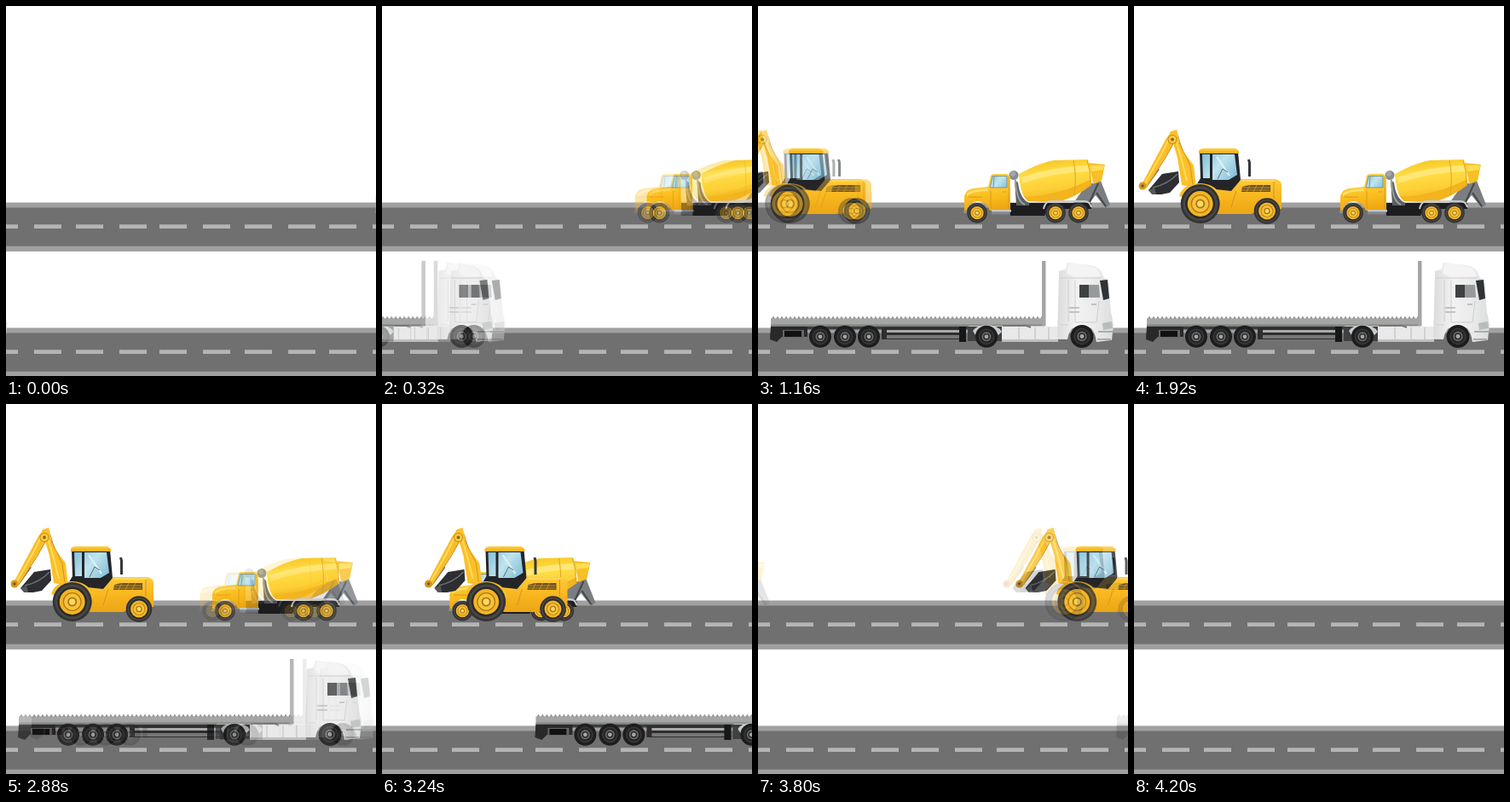
Write an HTML page with a canvas that moves like this. It is 434 px wide and 434 px high and loops after 4640 ms.

```html
<!DOCTYPE html>
<html lang="en">
<head>
<meta charset="utf-8">
<title>Construction traffic</title>
<style>
html, body { margin: 0; width: 100%; height: 100%; overflow: hidden; background: #fff; }
canvas { display: block; }
</style>
</head>
<body>
<canvas id="stage" width="434" height="434"></canvas>
<script>
const SIZE = 434, LOOP = 4640, STEP = 40;
const view = document.getElementById('stage').getContext('2d');
const scene = document.createElement('canvas');
scene.width = scene.height = SIZE;
const g = scene.getContext('2d');

const rect = (color, x, y, w, h) => { g.fillStyle = color; g.fillRect(x, y, w, h); };
const fill = (color, d) => { g.fillStyle = color; g.fill(new Path2D(d)); };
const line = (color, width, d) => {
  g.strokeStyle = color;
  g.lineWidth = width;
  g.stroke(new Path2D(d));
};
const disc = (color, x, y, r) => {
  g.fillStyle = color;
  g.beginPath();
  g.arc(x, y, r, 0, 7);
  g.fill();
};
const shade = (x0, y0, x1, y1, ...colors) => {
  const s = g.createLinearGradient(x0, y0, x1, y1);
  colors.forEach((c, i) => s.addColorStop(i / (colors.length - 1), c));
  return s;
};

// Concentric rings from the outside in
const wheel = (x, y, r, rings) => rings.forEach(([size, color]) => disc(color, x, y, r * size));
const GOLD = [[1, '#333333'], [.88, '#484745'], [.76, '#2b2a28'], [.65, '#f3b524'],
  [.48, '#b27c18'], [.42, '#f7c338'], [.24, '#a37420'], [.16, '#ffd95c']];
const STEEL = [[1, '#1d1d1e'], [.72, '#3c3c3d'], [.62, '#272728'], [.42, '#6e6e6e'],
  [.3, '#2d2d2d'], [.18, '#a8a8a8']];

function road(y) {
  rect('#a0a0a0', 0, y, SIZE, 57.4);
  rect('#707070', 0, y + 6, SIZE, 45.2);
  for (const x of [-18, 33, 82, 133, 180, 231, 280, 331, 379, 430])
    rect('#b5b5b5', x, y + 25.8, 32, 4.7);
}

function mixer() {
  // chute and chassis
  fill('#7b7e81', 'M370 231L385 210L402 205L413 233L408 237L396 222L388 232Z');
  line('#44474a', 2, 'M399 208L389 230M397 219L408 235');
  fill('#1d1d1f', 'M296 231H391V238H340L336 246H296Z');
  // drum
  fill(shade(335, 180, 341, 231, '#f8c522', '#ffdd45', '#fdd036', '#f0ae1a'),
    'M306 197Q330 184 347 181L387 180Q391 194 391 210Q370 226 350 230L317 229Q308 224 306 197Z');
  fill('#ffe777', 'M309 201Q346 188 388 187L389 194Q348 195 310 208Z');
  fill('#f3b41e', 'M313 224Q354 222 391 203V210Q370 226 350 230L317 229Z');
  line('#e0a51d', 1, 'M370 181Q374 199 371 222M386 181Q391 195 390 210');
  fill('#f7c026', 'M387 184L407 186L403 205L393 209Q391 195 387 184Z');
  fill('#ffdd52', 'M390 187L406 187L405 192L391 194Z');
  // water tank and drum support
  fill('#5c5f62', 'M301 204L305 207Q307 226 318 231V234H303Z');
  line('#9c9ea0', 2, 'M302 204Q303 229 313 233');
  disc('#898b8e', 300, 198.5, 5.5);
  disc('#a4a6a8', 299, 197, 3);
  line('#c9cacb', 2, 'M335 238Q337 229 343 229H383Q389 229 391 236');
  // cab
  fill(shade(242, 212, 246, 244, '#ffce40', '#fabb1b', '#ecA413'),
    'M242 242V223Q244 215 252 214L270 212L273 199Q274 197 278 197H292Q296 198 296 203V240H272Q268 229 257 229Q246 230 244 243Z');
  fill('#ffe06d', 'M245 220Q248 216 269 214L270 217Q251 217 245 223Z');
  fill(shade(273, 200, 290, 214, '#8bcbe0', '#bfe6f0', '#88c3da'),
    'M272 213L275 199.5H292V213Z');
  line('#7c8478', .8, 'M272 213L275 199.5H292V213ZM277 200L276 213');
  line('#d99a18', 1, 'M273 217V237M294 200V238M287 218H291M247 224H263');
  rect('#c5c7c8', 274, 239, 23, 2.5);
  rect('#85888a', 274, 242, 21, 2.5);
  rect('#8c8e8e', 241, 240, 5, 3);
  for (const x of [257, 349, 376]) wheel(x, 242.7, 11.8, GOLD);
}

function loader() {
  // bucket
  fill('#2d2e31', 'M17 216L33 197L52 194L53 207L42 219L32 221H22Z');
  line('#6b6d71', 1.5, 'M22 213Q40 209 51 197');
  fill('#55575b', 'M17 216L24 213L26 221L21 221Z');
  // arm
  line('#77797b', 2.5, 'M51 153L60 184M16 209L29 191');
  line('#c5c8c9', 1.2, 'M50 153L60 184');
  fill('#f9bd2a', 'M38 155L45 146L49 153L44 166L14 214L7 213Z');
  line('#ffdc58', 2, 'M42 154L31 176L11 211');
  line('#c38a1b', 1, 'M47 160L37 178L15 212');
  fill('#fbc02a', 'M42 148L50 145L56 168L70 187L73 213L56 210L51 178Z');
  line('#ffdc5b', 2, 'M48 153L56 181L62 205');
  line('#cf941c', 1, 'M53 160L66 187L69 210');
  disc('#c9880e', 45, 156.5, 5.5);
  disc('#ffcc40', 45, 156.5, 4.5);
  disc('#8d6a22', 45, 156.5, 2);
  disc('#d5981c', 10, 211, 4.5);
  disc('#6b5a36', 10, 211, 1.7);
  // cab
  fill('#242528', 'M77 171H122L125 204L118 217H69L78 202Z');
  fill(shade(80, 175, 117, 203, '#86bfd8', '#c0e4ef', '#86bfd8'),
    'M80 174H89V202H81ZM92 174H118L121 198L111 204H92Z');
  line('#dff3f8', 2, 'M97 177L112 199');
  line('#60676b', 1, 'M98 203L104 191L110 195');
  fill(shade(0, 167, 0, 173, '#ffcf45', '#f0ab14'), 'M76 170Q77 167 82 167H119L123 170V173H76Z');
  // bonnet and body
  line('#35373a', 3, 'M135.5 200V184L134.5 180');
  fill(shade(0, 203, 0, 243, '#ffcb3a', '#f8b71f', '#eda616'),
    'M114 217L126 203H165Q172 204 173 209V238H146L138 244H98L86 214Z');
  line('#ffdc64', 1.5, 'M127 205H165');
  fill('#6b5220', 'M127 212L135 210H160V218H126Z');
  line('#c89024', 1, 'M127 213H159M126 216H159M136 210L132 218M144 210L140 218M152 210L148 218');
  line('#d29320', 1, 'M120 217L114 236M164 206V226');
  fill('#f9bd28', 'M53 223Q57 208 78 208Q98 209 103 226L99 231Q94 212 77 212Q63 213 58 224Z');
  wheel(77.7, 232, 23, GOLD);
  wheel(156, 240.5, 15.3, GOLD);
}

function truck() {
  // trailer
  rect('#a4a6a4', 15, 366.5, 322, 8.5);
  rect('#858785', 15, 373.5, 322, 2);
  for (let x = 16; x < 334; x += 5) fill('#989a98', `M${x} 367L${x + 2} 363.5L${x + 4} 367Z`);
  rect('#a4a6a4', 333, 299, 4.5, 76);
  rect('#3b3c3d', 15, 375.5, 232, 4);
  fill('#29292a', 'M15 376H58V388H28L22 394L14 391Z');
  rect('#666', 29, 380, 25, 9);
  rect('#111', 31, 381, 20, 7);
  rect('#2e2e2f', 145, 377, 99, 14);
  rect('#aaaaaa', 151, 380, 87, 3);
  rect('#777777', 151, 386, 87, 4);
  rect('#171717', 236, 376, 8, 18);
  // tractor
  fill('#3f4041', 'M246 376H352V393H246Z');
  fill('#c9cac9', 'M252 381Q257 374 268 374Q281 374 286 382L282 386Q276 378 268 378Q259 378 255 386Z');
  rect('#e9e9e9', 286, 376, 66, 18);
  rect('#c0c0c0', 286, 391, 66, 3);
  line('#b8b8b8', 1, 'M306 377V391M325 377V391M341 377V391');
  line('#777', 2, 'M287 375H315L320 377');
  fill(shade(352, 0, 415, 0, '#dcdcdc', '#f2f2f2', '#ececec', '#dddede'),
    'M353 311L361 309L363 301L390 304Q402 306 405 317L411 325L414 359L417 373L415 392L397 394Q394 373 380 373Q366 374 363 391H351Z');
  fill('#f5f4f4', 'M364 302L391 305Q400 308 402 317L372 318L362 313Z');
  line('#cfcfcf', 1, 'M354 319H403M364 321V370M372 322V371H397L400 346M355 374H364');
  rect('#3e4142', 377, 327, 11, 15);
  fill('#969a9b', 'M388 327H400L401 342H388Z');
  fill('#303335', 'M401 322L410 321L412 343L405 345Z');
  line('#b5b5b5', 1.5, 'M391 350H397M365 354H377M365 359H377');
  fill('#b9bcbc', 'M404 372L415 370L416 378L405 380Z');
  line('#999', 1.5, 'M399 382H416M398 391H414');
  for (const x of [73, 102, 130, 268]) wheel(x, 387.8, 13, STEEL);
  wheel(380, 387.5, 13.5, STEEL);
}

// Linear travel: progress from 0 to 1 between ticks a and b
const ramp = (n, a, b) => Math.min(1, Math.max(0, (n - a) / (b - a)));

function place(vehicle, x) {
  g.save();
  g.translate(x, 0);
  vehicle();
  g.restore();
}

function drawTick(n) {
  rect('#fff', 0, 0, SIZE, SIZE);
  road(230.5);
  road(377.5);
  place(mixer, 193 * (1 - ramp(n, .9, 15)) - 414 * ramp(n, 87, 115));
  place(loader, -173 * (1 - ramp(n, 16, 42)) + 430 * ramp(n, 95, 124));
  place(truck, -417 * (1 - ramp(n, .9, 30)) + 421 * ramp(n, 87, 115));
}

// Motion runs at 30 ticks per second, cross-faded onto 40 ms steps
const start = performance.now();
function render() {
  const t = Math.floor((performance.now() - start) % LOOP / STEP) * STEP;
  const n = t * .03 + .8, tick = Math.floor(n);
  for (const [i, alpha] of [[tick, 1], [tick + 1, n - tick]]) {
    drawTick(i);
    view.globalAlpha = alpha;
    view.drawImage(scene, 0, 0);
  }
  requestAnimationFrame(render);
}
render();
</script>
</body>
</html>
```
